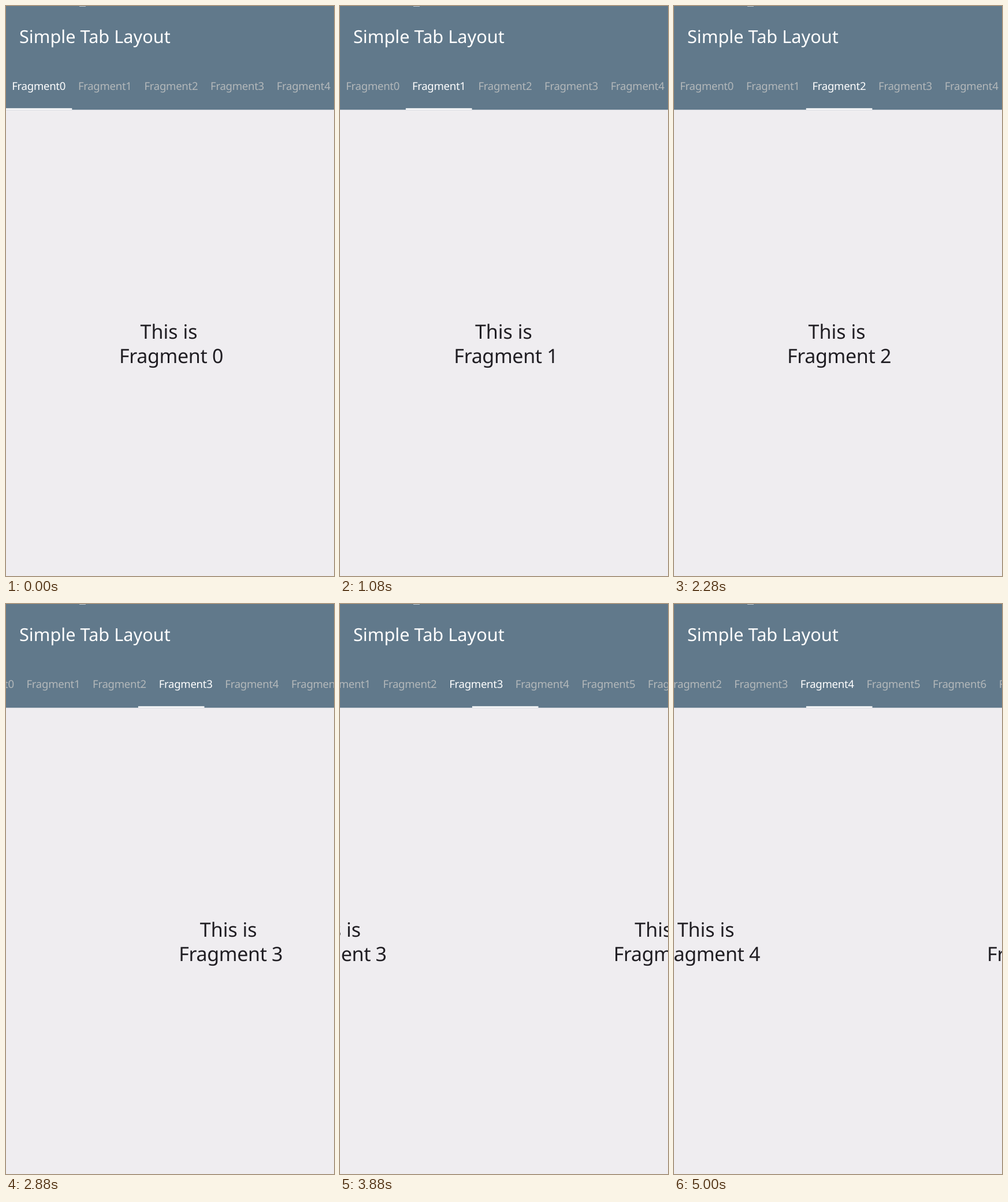
These frames come from a looping animation (568x985 px, 5.04 s). An HTML page:

```html
<!DOCTYPE html>
<html lang="en">
<head>
<meta charset="utf-8">
<title>Simple Tab Layout</title>
<style>
  html, body { margin: 0; width: 100%; height: 100%; overflow: hidden; background: #efedf0; }
  svg { display: block; width: 100%; height: 100%; font-family: "Noto Sans", "Open Sans", sans-serif; text-rendering: geometricPrecision; }
  .title { font-size: 30.7px; fill: #fff; }
  .tab { font-size: 18.6px; letter-spacing: -.3px; fill: #b3b8ba; text-anchor: middle; }
  .tab.on { fill: #fff; }
  .page { font-size: 34px; fill: #201e23; text-anchor: middle; }
  .name { letter-spacing: -.36px; }
</style>
</head>
<body>
<svg viewBox="0 0 568 985" preserveAspectRatio="none">
  <rect width="568" height="985" fill="#efedf0"/>
  <g id="pages" class="page"></g>
  <rect width="568" height="179.3" fill="#61798b"/>
  <rect x="127" width="11" height="1" fill="#c3ccd2"/>
  <text class="title" x="23" y="63.7">Simple Tab Layout</text>
  <g id="tabs"></g>
  <rect id="bar" y="176.7" width="114.6" height="2.6" fill="#fff"/>
</svg>
<script>
const LOOP = 5040, STEP = 40, LAG = 16.7;
const PAGE = 573, TAB = PAGE / 5, SETTLE = 520;

// Each swipe: start, finger path [ms, progress], end of the quintic settling.
const swipes = [
  { at: 600, drag: [[0, .01], [40, .04], [80, .1]], end: 654 },
  { at: 1760, drag: [[-17, .069], [0, .0716], [40, .25]], end: 689 },
  { at: 2680, drag: [[0, .01], [40, .055]], end: 607 },
  { at: 3760, drag: [[0, .01], [40, .054]], end: 679 },
  { at: 4920, drag: [[0, .01], [40, .06], [63.3, .18], [80, .396]], end: 680 }
];

const pages = document.getElementById("pages");
const tabs = document.getElementById("tabs");
const bar = document.getElementById("bar");

function addText(parent, text, x, y, cls) {
  const el = document.createElementNS("http://www.w3.org/2000/svg", "text");
  el.setAttribute("x", x);
  el.setAttribute("y", y);
  if (cls) el.setAttribute("class", cls);
  el.textContent = text;
  parent.appendChild(el);
  return el;
}

for (let i = 0; i < 6; i++) {
  addText(pages, "This is", 282 + i * PAGE, 575.2);
  addText(pages, "Fragment " + i, 286 + i * PAGE, 617.2, "name");
}
const labels = Array.from({ length: 10 }, (_, i) =>
  addText(tabs, "Fragment" + i, 56.7 + i * TAB, 145, "tab"));

function progress({ drag, end }, t) {
  if (t <= -20) return 0;
  if (t >= SETTLE) return 1;
  let [t0, p0] = [-20, 0];
  for (const [t1, p1] of drag) {
    if (t < t1) return p0 + (p1 - p0) * (t - t0) / (t1 - t0);
    [t0, p0] = [t1, p1];
  }
  return 1 - (1 - p0) * ((end - t) / (end - t0)) ** 5;
}

// The tab strip follows the pages one screen refresh later.
function position(t, lag) {
  return swipes.reduce((sum, s) =>
    sum + (t < s.at ? 0 : progress(s, t - s.at - lag)), 0);
}

function draw(t) {
  const page = position(t, 0), tab = position(t, LAG);
  const scroll = Math.max(0, tab - 2) * TAB;
  pages.setAttribute("transform", `translate(${-page * PAGE} 0)`);
  tabs.setAttribute("transform", `translate(${-scroll} 0)`);
  bar.setAttribute("x", tab * TAB - scroll - .3);
  labels.forEach((el, i) => el.classList.toggle("on", i === Math.round(tab)));
}

const start = performance.now();
function tick() {
  const t = (performance.now() - start) % LOOP;
  draw(Math.floor(t / STEP) * STEP);
  requestAnimationFrame(tick);
}
tick();
</script>
</body>
</html>
```
